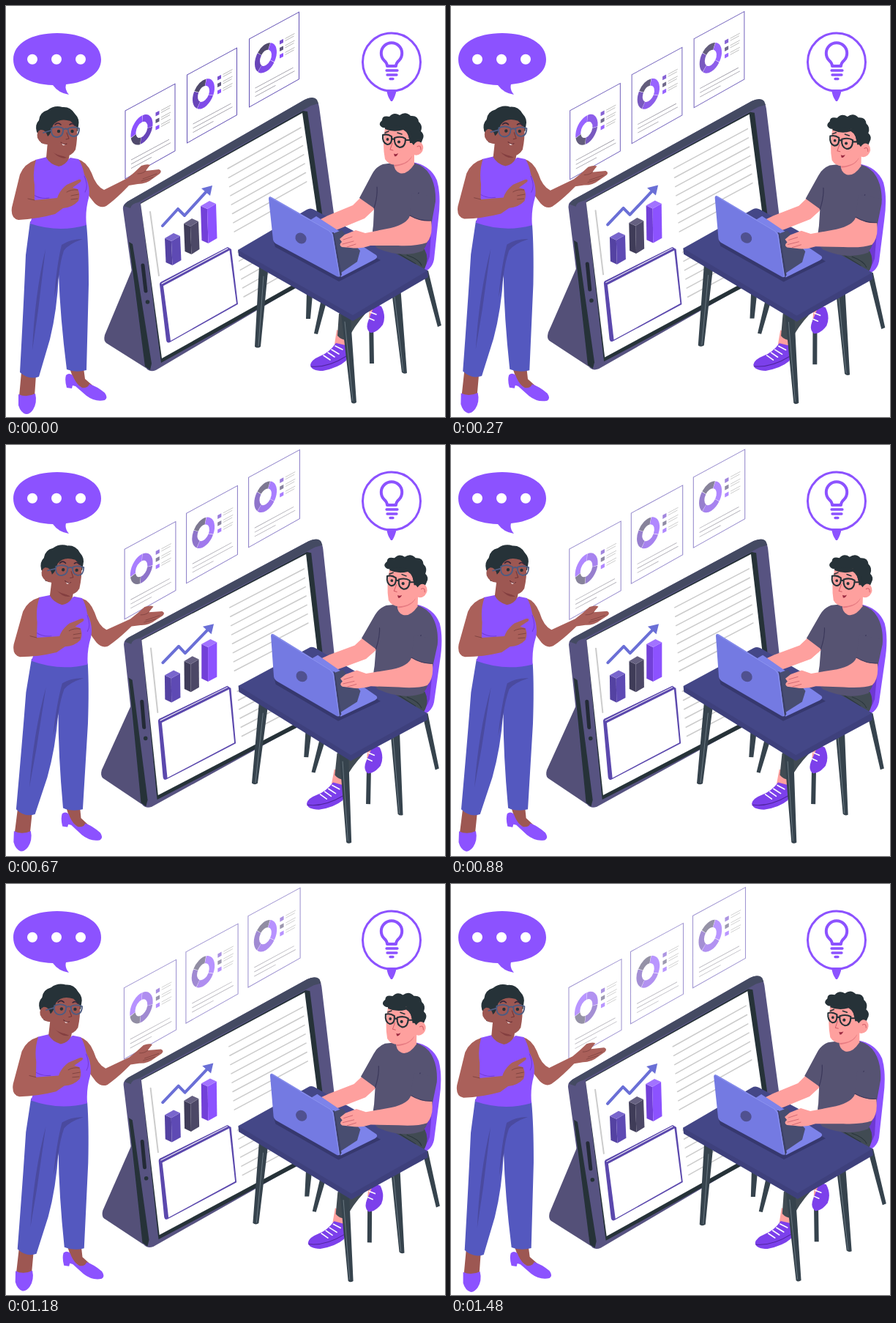
An HTML page for the animation above (1510 ms loop, 600x561 px).

```html
<!DOCTYPE html>
<html lang="en">
<head>
<meta charset="utf-8">
<title>Team presentation</title>
<style>
html, body { margin: 0; width: 100%; height: 100%; overflow: hidden; background: #fff; }
svg { display: block; width: 100%; height: 100%; }
.violet { fill: #8c52ff; }
.ink { fill: #263238; }
.brown { fill: #aa605a; }
.face { fill: #9d5752; }
.pink { fill: #fea09e; }
.leg { fill: #36434d; }
.line { fill: none; stroke-linecap: round; stroke-linejoin: round; }
</style>
</head>
<body>
<svg viewBox="0 0 600 561" xmlns="http://www.w3.org/2000/svg">
  <g id="papers"></g>

  <g id="tablet">
    <path fill="#545078" d="M173 358L135 449Q133 457 137 460L191 494L203 485Z"/>
    <path fill="#575381" d="M160 278Q159 271 166 267L408 128Q425 120 428 138L457 348L205 497Q195 501 190 492Z"/>
    <path fill="#444a62" d="M161 273L166 267L408 128Q420 122 425 128L427 133L417 136L181 268Q171 270 170 276Z"/>
    <path class="ink" d="M168 322L173 325L199 488L197 497L190 492Z"/>
    <path class="ink" d="M184 269L406 143L412 144L443 359L212 487L211 480Z"/>
    <path fill="#fff" d="M184 270L405 146L436 356L213 481Z"/>
    <path class="line" stroke="#232a36" stroke-width="5" d="M187 354L191 389"/>
    <circle class="ink" cx="193.500" cy="404" r="2.800"/>
    <path class="line" stroke="#ccc" stroke-width="2" d="M197 281L209 368"/>
    <g id="rows" class="line" stroke="#cbcbcb" stroke-width="1.500"></g>
    <g id="bars"></g>
    <path class="line" stroke="#6a6fd6" stroke-width="4" stroke-linecap="butt" d="M214 300L235 277L244 286L275 252"/>
    <path fill="#6a6fd6" d="M282 245L279 259L267 249Z"/>
    <path fill="#5b48ad" d="M210 380Q210 377 213 376L303 329L308 332L317 407L224 459Q220 461 219 456Z"/>
    <path fill="#fff" d="M215 382L305.500 333.500L315 406L225 457Z"/>
    <path class="line" stroke="#fff" stroke-width="1" d="M213 379L303 331"/>
  </g>

  <g id="woman">
    <path class="face" d="M21 500L41 504L39 533L18 533ZM86 492L106 494L108 509L123 522L112 528L94 514Z"/>
    <path class="violet" d="M17 530Q28 535 40 529Q43 541 37 551Q32 558 27 557Q20 555 17 545Z"/>
    <path class="violet" d="M82 504Q86 500 91 504Q96 517 104 521Q112 522 114 516Q124 519 135 528Q140 535 135 538Q122 541 110 532L95 519L91 518L90 522L83 521Q80 511 82 504Z"/>
    <path fill="#5458bf" d="M33 294L110 298Q113 330 113 380L110 497Q95 501 83 496Q74 425 72 366Q70 415 60 455L45 506Q31 511 19 500Q24 410 27 340Z"/>
    <path fill="#4a4a9f" d="M76 326Q88 318 105 318Q85 325 79 334Q74 349 72 369L66 398Q69 355 76 326ZM54 332L44 415L36 470Q39 395 54 332Z"/>
    <path class="brown" d="M88 209L98 209Q110 212 117 228Q123 246 134 251L166 235Q176 227 185 218Q193 215 197 217Q193 222 191 225L209 223Q214 225 210 229L200 236Q192 243 180 243L168 245Q151 263 137 273Q129 277 121 269Q112 258 104 246Z"/>
    <path class="line" stroke="#7d423f" stroke-width=".8" d="M187 236L206 229M180 229Q187 229 191 225M185 239L201 234"/>
    <path class="violet" d="M40 210L56 206Q72 221 88 207L99 209Q104 216 107 230Q116 246 113 262Q108 280 110 299Q72 310 33 297Q40 275 38 260Q33 232 40 210Z"/>
    <path class="line" stroke="#713ad8" stroke-width="1" d="M107 232Q113 246 108 254M38 258Q48 264 59 262"/>
    <path class="brown" d="M41 210Q25 215 19 230L8 275Q6 290 17 292Q42 291 67 284L78 276Q91 275 99 266Q102 257 98 250L91 248L102 240Q104 236 99 237L83 244Q73 252 70 262L39 265Q39 255 39 244Q36 226 41 210Z"/>
    <path class="line" stroke="#7d423f" stroke-width=".9" d="M98 251Q89 250 83 254M99 257L89 259M98 263L89 264M39 265L30 263"/>
    <path class="face" d="M57 185L88 195L86 208Q82 217 72 219Q60 216 55 207Z"/>
    <path fill="#843f40" d="M64 199L83 207Q74 210 64 199Z"/>
    <path class="ink" d="M42 172Q39 162 45 156Q46 145 57 142Q66 135 77 138Q88 137 94 147Q101 154 99 163L98 171L65 176L59 189L48 187Q47 177 42 172Z"/>
    <path class="face" d="M64 163Q72 152 88 157L97 166Q98 181 95 196Q90 205 80 205Q69 204 62 198L57 189Q47 189 43 180Q41 172 47 169Q54 168 57 178Q62 174 64 163Z"/>
    <path class="line" stroke="#35273a" stroke-width="1.600" d="M67 162Q71 158 75 162M87 162Q91 159 94 163"/>
    <g class="line" stroke="#4d5c82" stroke-width="1.800">
      <path d="M62 167Q70 163 78 167Q79 178 70 179Q61 179 62 167ZM85 167Q93 164 100 167Q100 178 92 178Q84 177 85 167ZM78 169Q82 166 85 169M61 170L51 173"/>
    </g>
    <circle class="ink" cx="72" cy="171" r="2.200"/>
    <circle class="ink" cx="90.500" cy="171" r="2.200"/>
    <path class="line" stroke="#713638" stroke-width="1" d="M83 173L86 181L82 182"/>
    <path fill="#f3dcda" d="M76 187Q79 189.500 82 188Q80 191 77.500 190Z"/>
    <path class="line" stroke="#632c32" stroke-width="1" d="M75 186Q79 190 83 188"/>
  </g>

  <g id="man">
    <path class="leg" d="M431 400L438 404L426 448L421 447ZM496 425L502 424L503 488L497 488ZM570 364L577 361L595 436L590 438ZM411 390L419 394L416 427L410 427Z"/>
    <path class="violet" d="M555 213Q580 217 589 238Q595 258 591 290L585 346Q582 362 564 365L538 345L573 300Z"/>
    <path fill="#6e38d2" d="M576 308L582 292L579 342Q575 357 562 362L551 350Q573 340 576 308Z"/>
    <path class="pink" d="M452 442L467 449L464 467L449 462ZM497 407L507 405L508 420L496 426Z"/>
    <path fill="#414b53" d="M455 420L496 399L492 419Q475 438 467 456Q458 456 453 450Z"/>
    <path fill="#7c40eb" d="M451 460L464 463Q469 474 465 484Q454 494 433 498Q417 498 416 490Q417 483 429 478Q442 473 451 460Z"/>
    <path fill="#7c40eb" d="M504 407L513 410Q520 423 515 435Q507 446 498 446Q491 441 495 430Z"/>
    <path class="line" stroke="#fff" stroke-width="1.600" d="M450 464L460 469M445 469L455 475M440 473L449 479M434 477L443 483M498 418L506 421M496 426L503 429"/>
    <path class="line" stroke="#4f249e" stroke-width="1" d="M417 492Q440 494 465 478"/>
    <path class="leg" d="M346 355L358 362L348 465Q344 468 340 465ZM458 420L471 426L479 541Q475 544 472 541ZM527 389L539 382L548 501Q544 503 541 500Z"/>
    <path class="line" stroke="#697780" stroke-width="1" d="M352 369L345 464M463 431L474 539M531 397L543 499"/>
    <path fill="#414b53" d="M510 326L572 332Q579 345 572 359L546 354L505 335Z"/>
    <path class="line" stroke="#29343b" stroke-width="1" d="M548 340Q565 346 568 354M535 337L560 352"/>
    <path fill="#3e407c" d="M317 333L576 361L577 370L474 430L318 341Z"/>
    <path fill="#444787" d="M317 333L411 278Q416 275 421 278L576 361L474 422Z"/>
    <path fill="#36386e" d="M365 319L368 329L455 376L512 347L486 333Z"/>
    <path class="pink" d="M486 260L474 272L440 286L426 293Q419 297 429 303L443 309L456 304L490 290L505 276Z"/>
    <path class="line" stroke="#cd6670" stroke-width=".8" d="M424 297L436 303M430 293L440 299"/>
    <path fill="#565372" d="M515 216L530 214Q540 230 557 214Q572 218 579 230Q588 245 587 267L581 300Q578 323 570 334Q542 345 508 331Q498 324 502 299L503 276L483 262L500 230Q505 220 515 216Z"/>
    <path class="line" stroke="#3b385a" stroke-width="1.200" d="M503 276Q508 260 507 247M556 287Q559 268 564 255M515 308Q535 312 550 301"/>
    <path fill="#7d83ea" d="M413 294L424 287L506 340Q509 343 504 346L458 370L446 330Z"/>
    <path fill="#484d70" d="M446 311L459 306L484 334L480 349L458 364Z"/>
    <path fill="#3c4067" d="M442 309L448 309L459 367L455 371Z"/>
    <path fill="#747ae2" d="M359 263Q359 259 363 261L442 306Q446 308 447 312L456 368Q456 371 452 369L370 325Q366 323 365 319Z"/>
    <path class="line" stroke="#8990ee" stroke-width="1.200" d="M361 261L442 307L446 312L456 369"/>
    <ellipse cx="403" cy="317" rx="8" ry="7" transform="rotate(38 403 317)" fill="#505190"/>
    <path class="pink" d="M552 286L581 293Q584 313 575 323Q562 328 536 327L498 327Q484 332 471 330L459 329Q454 326 459 322L456 318L463 312L478 306L491 310L526 303Q549 297 552 286Z"/>
    <path class="line" stroke="#cd6670" stroke-width=".9" d="M461 319L473 315M460 325L475 321M466 329L478 325"/>
    <path fill="#565372" d="M555 255L552 286Q568 295 581 293L587 260Z"/>
    <path class="line" stroke="#3b385a" stroke-width="1" d="M552 286Q566 294 581 293"/>
    <path class="pink" d="M531 203L558 197L558 216Q548 231 538 228Q530 225 530 214Z"/>
    <path fill="#e67b82" d="M531 213Q545 214 555 205Q550 217 531 219Z"/>
    <path class="ink" d="M515 166Q507 162 514 156Q514 149 524 151Q530 144 538 149Q546 143 553 150Q563 149 564 158Q570 163 567 171Q573 176 569 183Q567 190 560 193L551 185L545 170Z"/>
    <path class="pink" d="M518 166Q530 169 543 165Q549 170 551 182L557 190Q562 182 568 187Q573 194 567 201Q561 206 556 202Q551 214 538 216Q524 219 518 209Q514 190 518 166Z"/>
    <path class="ink" d="M518 165Q535 162 548 166Q557 174 557 187L552 187Q551 173 543 169Q530 173 518 168Z"/>
    <g class="line" stroke="#263238" stroke-width="2.100">
      <path d="M515 176Q521 174 527 178Q528 189 521 189Q514 187 515 176ZM531 180Q540 177 546 181Q546 193 538 193Q530 191 531 180ZM527 181L531 182M546 183L557 183"/>
    </g>
    <circle class="ink" cx="521.500" cy="182" r="1.900"/>
    <circle class="ink" cx="537" cy="185.500" r="2.100"/>
    <path class="line" stroke="#263238" stroke-width="1.500" d="M518 173L523 171M535 173L541 175"/>
    <path class="line" stroke="#d25e68" stroke-width="1" d="M528 187L525 196L529 197M562 192Q567 189 567 196"/>
    <path fill="#9c2b42" d="M530 201.500Q533 203 536 201Q534 206 531 205Z"/>
  </g>

  <g class="violet">
    <path d="M70 37C105 37 130 51 130 73C130 92 111 104 82 107Q80 114 86 121Q72 119 64 108C31 107 10 94 10 73C10 51 35 37 70 37Z"/>
    <g id="dots" fill="#fff"></g>
    <path d="M520 114L534 114Q532 124 528 130L526 130Q521 123 520 114Z"/>
  </g>
  <g class="line" stroke="#8c52ff">
    <circle cx="527" cy="76.500" r="39.500" stroke-width="3"/>
    <path stroke-width="4" d="M521 82Q521 78 516.500 74A14.200 14.200 0 1 1 537.500 74Q533 78 533 82Z"/>
    <path stroke-width="3.300" d="M520 88H535M521 94H534M525 99.500H529"/>
  </g>
</svg>
<script>
const LOOP = 1510;
const byId = id => document.getElementById(id);
const poly = (points, fill) => `<polygon points="${points}" fill="${fill}"/>`;

function bar(x, y, h, w, [left, right, top]) {
  const a = [x, y], b = [x + 9, y + 4], c = [x + w, y - 3], d = [x + w - 9, y - 7];
  const low = ([px, py]) => [px + 1.500, py + h];
  return poly([a, b, low(b), low(a)], left) +
    poly([b, c, low(c), low(b)], right) + poly([a, b, c, d], top);
}

function donut(turn) {
  const parts = [[0, 27, "#7f4be8"], [27, 24, "#6845b8"], [51, 20, "#504a6c"], [71, 29, "#8c52ff"]];
  const arcs = parts.map(([at, len, color]) =>
    `<circle r="11.500" pathLength="100" fill="none" stroke="${color}" stroke-width="7"
      stroke-dasharray="${len - .5} ${100.5 - len}" stroke-dashoffset="${-at}"/>`).join("");
  return `<g transform="translate(22.500 38) scale(1 1.270) rotate(${turn})">${arcs}</g>`;
}

function paper(turn) {
  const colors = ["#7850d0", "#5f587e", "#8c52ff"];
  const legend = colors.map((c, i) => {
    const y = 25 + i * 9.500;
    return `<rect x="41.500" y="${y}" width="5" height="5" fill="${c}"/>
      <path d="M49 ${y + 1}H62M49 ${y + 4}H61" stroke="#999" stroke-width=".6"/>`;
  }).join("");
  const text = [52, 54, 28].map((w, i) =>
    `<path d="M8 ${71.500 + i * 5.700}h${w}" stroke="#8d8a96" stroke-width=".8"/>`).join("");
  return `<path d="M0 0H68V91.500L0 93Z" fill="#fff" stroke="#6250b4" stroke-width="1"/>
    ${donut(turn)}${legend}${text}`;
}

const sheets = [[163, 143, -85], [247.500, 94, 30], [332.500, 45, 40]];
byId("papers").innerHTML = sheets.map(s => `<g>${paper(s[2])}</g>`).join("");
const sheetNodes = [...byId("papers").children];

let rows = "";
for (let i = 0; i < 8; i++) {
  const x = 303 + i * 1.300, y = 222 + i * 12.300;
  const w = i < 7 ? 100 : 58;
  rows += `<path d="M${x} ${y}l${w} ${-w * .56}"/>`;
}
for (let i = 0; i < 6; i++) {
  const y = 336 + i * 12.200;
  rows += `<path d="M${317 + i * 1.600} ${y}l62 -34.700"/>`;
}
byId("rows").innerHTML = rows;

byId("bars").innerHTML =
  bar(217, 317, 33, 21, ["#5442a2", "#5e4ab4", "#7966cd"]) +
  bar(243, 297, 38, 20, ["#3f3c58", "#4c4866", "#656080"]) +
  bar(266, 273, 47, 21, ["#7240d8", "#8c52ff", "#a273ff"]);

byId("dots").innerHTML = [36, 69, 102].map(x => `<circle cx="${x}" cy="72.700" r="7"/>`).join("");

const sway = [["woman", 2, 98, 350], ["tablet", 1.800, 308, 312], ["man", 2.050, 435, 348]]
  .map(([id, angle, x, y]) => ({ node: byId(id), angle, x, y }));

function draw(now) {
  const p = now % LOOP / LOOP;
  const lean = Math.sin(Math.PI * p);
  for (const { node, angle, x, y } of sway)
    node.setAttribute("transform", `rotate(${angle * lean} ${x} ${y})`);

  const grow = 1 + .06 * p;
  sheetNodes.forEach((node, i) => {
    const [x, y] = sheets[i];
    node.setAttribute("transform",
      `matrix(1 -.54 0 1 ${x} ${y}) translate(34 46) scale(${grow}) translate(-34 -46)`);
    node.setAttribute("opacity", 1 - .4 * Math.sin(Math.PI / 2 * p));
  });
}

const start = performance.now();
function tick() {
  draw(performance.now() - start);
  requestAnimationFrame(tick);
}
tick();
</script>
</body>
</html>
```
